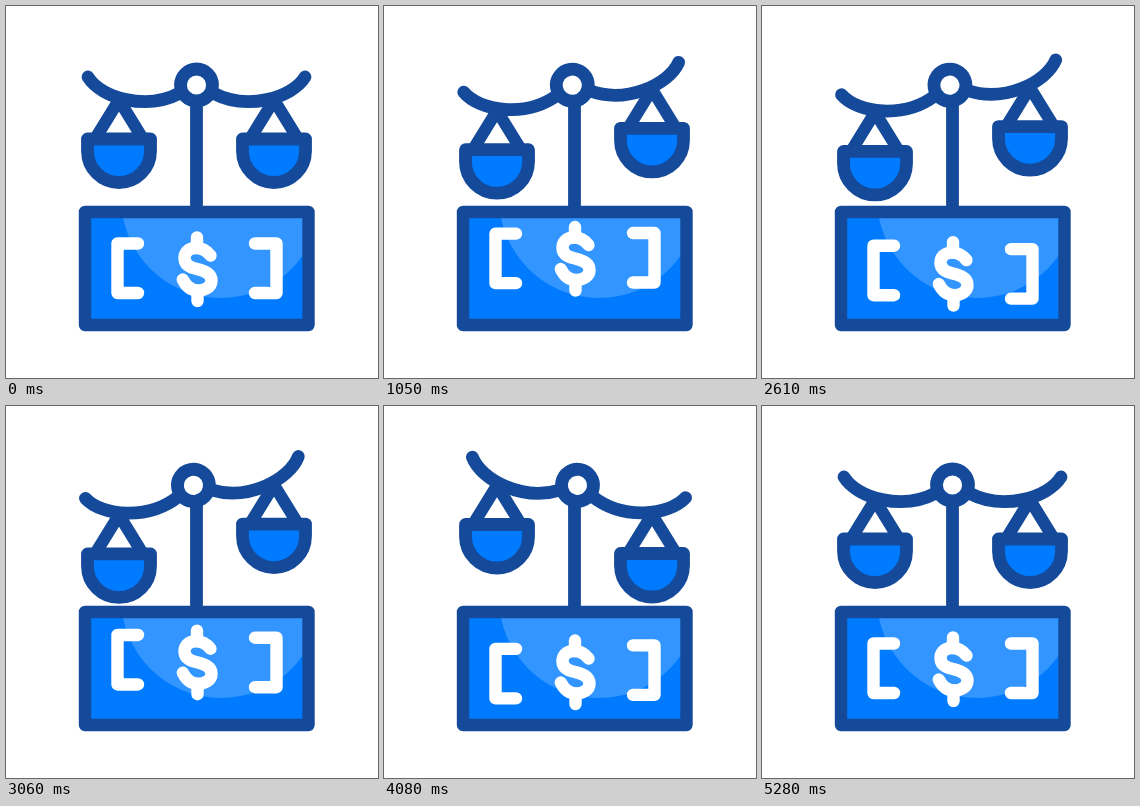
An HTML page that plays this animation: 372x372 px, repeating every 5430 ms.

```html
<!DOCTYPE html>
<html lang="en">
<head>
<meta charset="utf-8">
<title>Scales and banknote</title>
<style>
  html, body { margin: 0; width: 100%; height: 100%; overflow: hidden; background: #fff; }
  svg { display: block; width: 100vw; height: 100vh; }
  .line, .mark { fill: none; stroke-linecap: round; stroke-linejoin: round; }
  .line { stroke: #154a9a; stroke-width: 12.8; }
  .mark { stroke: var(--pale); stroke-width: 12.4; }
  #art { --pale: #fff; }
</style>
</head>
<body>
<svg id="art" viewBox="0 0 372 372">
  <defs>
    <clipPath id="inside"><rect x="79" y="206" width="223.5" height="113"/></clipPath>
    <g id="pan">
      <path class="line" style="stroke-width:12.2" d="M-24 133 L0 94 L24 133"/>
      <path class="line" style="fill:#007bff" d="M-31.5 133 V145 A31.5 31.5 0 0 0 31.5 145 V133 Z"/>
    </g>
    <path id="arm" class="line" d="M82 71 C95 92 140 105 174 87"/>
  </defs>

  <path class="line" d="M190.5 95 V206"/>
  <use id="panL" href="#pan"/>
  <use id="panR" href="#pan"/>
  <g id="beam">
    <use href="#arm"/>
    <use href="#arm" transform="translate(381 0) scale(-1 1)"/>
    <circle class="line" style="fill:var(--pale)" cx="190.5" cy="79" r="16"/>
  </g>

  <rect x="79" y="206" width="223.5" height="113" fill="#007bff"/>
  <circle cx="215" cy="192" r="100" fill="#3395ff" clip-path="url(#inside)"/>
  <rect class="line" style="stroke-width:12.4" x="79" y="206" width="223.5" height="113"/>
  <path id="left" class="mark" d="M132 237.5 H111.5 V287 H132"/>
  <g id="dollar">
    <path class="mark" d="M191 231.5 V242 M191.5 285 V295"/>
    <path class="mark" d="M204.5 249.5 C201 245 196 242 190 242 C182 242 178.5 247 178.5 252 C178.5 260 186 262 191 263 C199 265 205.5 267.5 205.5 274.5 C205.5 281 199 284.5 192 284.5 C185 284.5 180 280 176.8 273.5"/>
  </g>
  <path id="right" class="mark" d="M249 237.5 H270.5 V287 H249"/>
</svg>
<script>
const LOOP = 5430, STEP = 30, PIVOT = { x: 190.5, y: 95 }, REACH = 77.5;
const el = id => document.getElementById(id);

// Eased value between [time, value] knots
function track(knots, t) {
  const i = knots.findIndex(k => t < k[0]);
  if (i === 0) return knots[0][1];
  if (i < 0) return knots[knots.length - 1][1];
  const [t0, a] = knots[i - 1], [t1, b] = knots[i];
  const u = (t - t0) / (t1 - t0);
  return a + (b - a) * u * u * (3 - 2 * u);
}

const tilt = [[540, 0], [1380, -12], [1790, -8.2], [2200, -12], [2590, -9.2],
              [2960, -12], [3820, 11.8], [3920, 11.8], [4800, 0]];

const bob = (start, first, end) => [
  [start, 0],
  ...[-10.5, 10.5, -10.5, 10.5].map((y, i) => [first + i * 1178, y]),
  [end, 0]
];
const marks = {
  left: bob(330, 925, 5180),
  dollar: bob(360, 1020, 5240),
  right: bob(390, 1065, 5280)
};

function draw(time) {
  const t = Math.floor((time % LOOP) / STEP) * STEP;
  const angle = track(tilt, t);
  const drop = REACH * Math.sin(angle * Math.PI / 180);
  el("beam").setAttribute("transform", `rotate(${angle} ${PIVOT.x} ${PIVOT.y})`);
  el("panL").setAttribute("transform", `translate(${PIVOT.x - REACH} ${-drop})`);
  el("panR").setAttribute("transform", `translate(${PIVOT.x + REACH} ${drop})`);
  for (const id in marks)
    el(id).setAttribute("transform", `translate(0 ${track(marks[id], t)})`);

  const tint = Math.max(0, 1 - Math.abs(t - 1830) / 120);
  el("art").style.setProperty("--pale", `rgb(${255 - 25 * tint},${255 - 13 * tint},255)`);
}

const begin = performance.now();
function tick() {
  draw(performance.now() - begin);
  requestAnimationFrame(tick);
}
tick();
</script>
</body>
</html>
```
